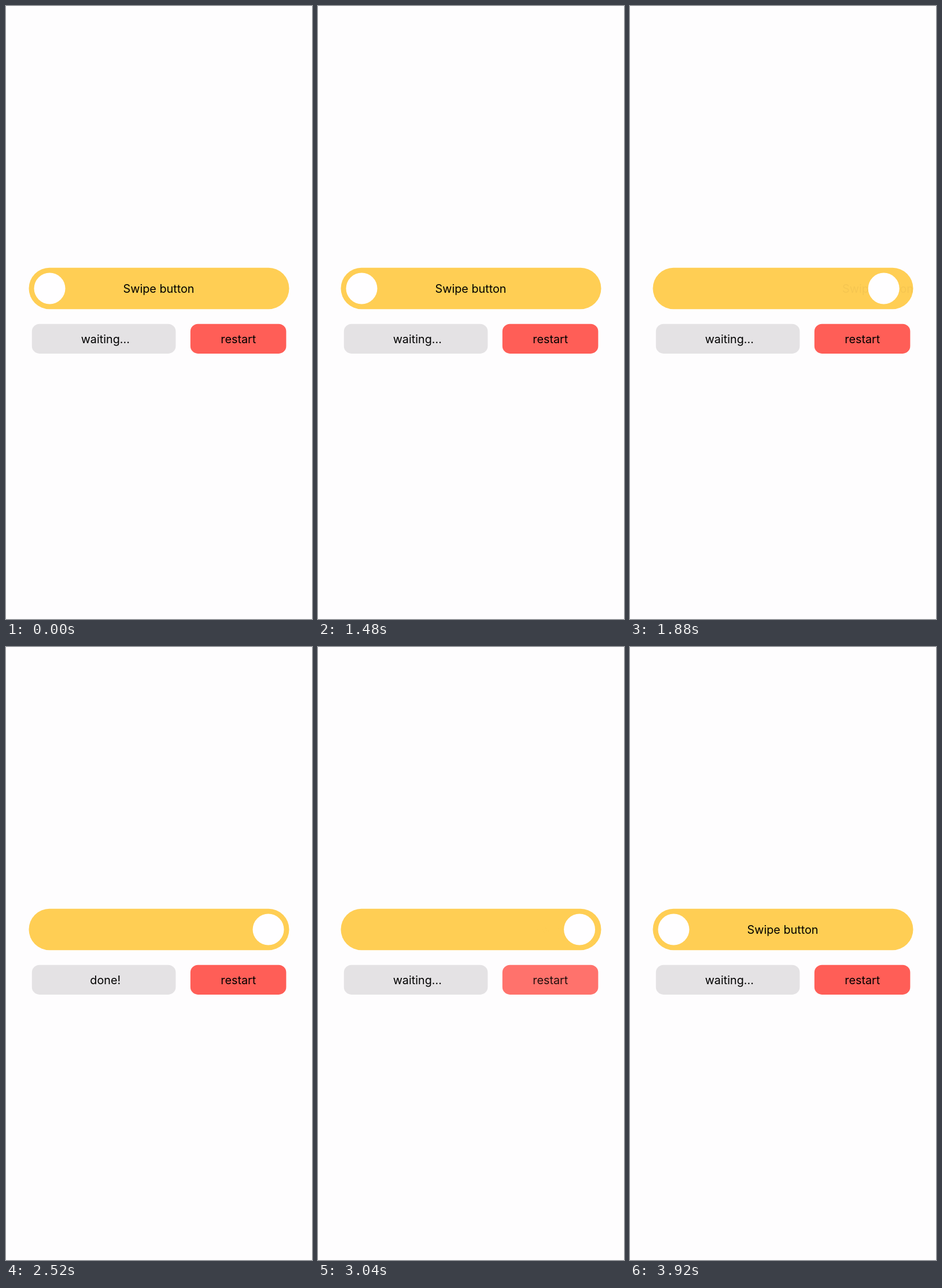
Write an HTML page with a canvas that moves like this. It is 529 px wide and 1058 px high and loops after 3960 ms.

```html
<!DOCTYPE html>
<html lang="en">
<head>
<meta charset="utf-8">
<title>Swipe button</title>
<style>
  html, body { margin: 0; width: 100%; height: 100%; overflow: hidden; background: #fefdfe; }
  canvas { display: block; width: 529px; height: 1058px; }
</style>
</head>
<body>
<canvas id="stage"></canvas>
<script>
const W = 529, H = 1058, LOOP = 3960;
const TRAVEL = 378;       // full way of the knob
const DRIFT = 0.453;      // label follows the knob at this rate
const MID = 487.5;

const canvas = document.getElementById('stage');
const ctx = canvas.getContext('2d');
const dpr = window.devicePixelRatio || 1;
canvas.width = W * dpr;
canvas.height = H * dpr;
ctx.scale(dpr, dpr);

const ease = p => p < 0.5 ? 2 * p * p : 1 - 2 * (1 - p) * (1 - p);

// Keys are [time, value]; values ease from one key to the next.
function track(keys, t) {
  if (t <= keys[0][0]) return keys[0][1];
  for (let i = 1; i < keys.length; i++) {
    const [t0, a] = keys[i - 1], [t1, b] = keys[i];
    if (t < t1) return a + (b - a) * ease((t - t0) / (t1 - t0));
  }
  return keys[keys.length - 1][1];
}

// Two short swipes fall back, the third one completes, then restart.
const knobKeys = [
  [70, 0], [320, 200], [580, 0],
  [1100, 0], [1260, 160], [1480, 0],
  [1537, 0], [1937, TRAVEL],
  [3028, TRAVEL], [3328, 0]
];
const pressKeys = [[2750, 1], [2872, 0.4], [3122, 1]];
const DONE_AT = 2120, RESET_AT = 2872;

function box(x, y, w, h, r, color) {
  ctx.fillStyle = color;
  ctx.beginPath();
  ctx.roundRect(x, y, w, h, r);
  ctx.fill();
}

function text(str, x, y) {
  ctx.fillStyle = '#000';
  ctx.fillText(str, x, y);
}

function draw(t) {
  const shift = track(knobKeys, t);
  ctx.globalAlpha = 1;
  ctx.fillStyle = '#fefdfe';
  ctx.fillRect(0, 0, W, H);
  ctx.font = '19.8px Inter, Roboto, sans-serif';
  ctx.textAlign = 'center';
  ctx.textBaseline = 'alphabetic';

  box(39.5, 451.8, 450, 71.4, 35.7, '#ffce54');
  ctx.save();
  ctx.clip();
  ctx.globalAlpha = 1 - shift / TRAVEL;
  text('Swipe button', 264 + shift * DRIFT, 494.7);
  ctx.restore();

  ctx.fillStyle = '#fffeff';
  ctx.beginPath();
  ctx.arc(75.5 + shift, MID, 27, 0, Math.PI * 2);
  ctx.fill();

  box(44.8, 548.7, 248.6, 51.2, 13, '#e4e2e4');
  text(t >= DONE_AT && t < RESET_AT ? 'done!' : 'waiting...', 171.8, 581.6);

  ctx.globalAlpha = track(pressKeys, t);
  box(318.8, 548.7, 165.6, 51.2, 13, '#ff5e57');
  text('restart', 401.8, 581.6);
}

const start = performance.now();
function tick() {
  draw((performance.now() - start) % LOOP);
  requestAnimationFrame(tick);
}
tick();
</script>
</body>
</html>
```
